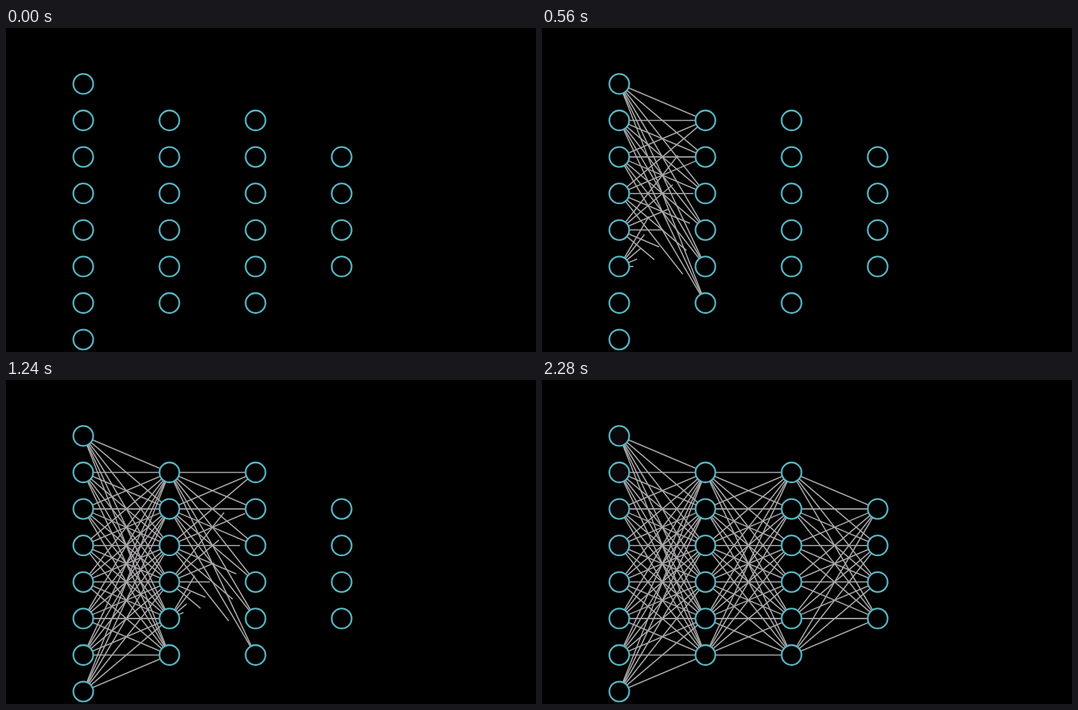
These frames come from a looping animation (720 by 440 pixels, 2320 ms). An HTML page with a canvas:

```html
<!DOCTYPE html>
<html lang="en">
<head>
<meta charset="utf-8">
<title>Network edges</title>
<style>
  html, body { margin: 0; width: 100%; height: 100%; overflow: hidden; background: #000; }
  canvas { display: block; }
</style>
</head>
<body>
<canvas id="stage" width="720" height="440"></canvas>
<script>
const ctx = document.getElementById('stage').getContext('2d');

const LOOP = 2320, STEP = 40;      // ms
const DRAW_TICKS = 60;             // edge drawing lasts 60 ticks at 30 per second
const LAG = 8;                     // each edge takes 1/LAG of the drawing time
const RADIUS = 13.5;

const layers = [8, 6, 6, 4].map((count, col) =>
  Array.from({ length: count }, (_, row) => ({
    x: 105 + col * 117,
    y: 249.5 + (row - (count - 1) / 2) * 49.6
  })));

// Edges run from rim to rim, ordered by layer, left node, right node.
const edges = layers.slice(1).flatMap((right, i) =>
  layers[i].flatMap(a => right.map(b => {
    const dx = b.x - a.x, dy = b.y - a.y, k = RADIUS / Math.hypot(dx, dy);
    return { x: a.x + dx * k, y: a.y + dy * k, dx: dx * (1 - 2 * k), dy: dy * (1 - 2 * k) };
  })));

const clamp = v => Math.min(1, Math.max(0, v));

function drawEdges(alpha) {
  ctx.strokeStyle = '#acaaac';
  ctx.lineWidth = 1.6;
  edges.forEach((e, i) => {
    const p = clamp(LAG * alpha - (LAG - 1) * i / edges.length);
    if (!p) return;
    ctx.beginPath();
    ctx.moveTo(e.x, e.y);
    ctx.lineTo(e.x + e.dx * p, e.y + e.dy * p);
    ctx.stroke();
  });
}

function drawNodes(glow) {
  ctx.strokeStyle = '#58b6c5';
  ctx.lineWidth = 2.3;
  layers.forEach((nodes, col) => nodes.forEach((n, row) => {
    ctx.beginPath();
    ctx.arc(n.x, n.y, RADIUS, 0, 2 * Math.PI);
    if (glow && col === 0 && row < 4) {
      ctx.fillStyle = glow;
      ctx.fill();
    }
    ctx.stroke();
  }));
}

function render(time) {
  const step = Math.floor((time % LOOP) / STEP);
  const tick = Math.round(step * STEP * 0.03);
  const ms = step * STEP;
  ctx.fillStyle = '#000';
  ctx.fillRect(0, 0, 720, 440);
  drawEdges(Math.min(1, tick / DRAW_TICKS));
  drawNodes(ms >= 2280 ? '#0a080a' : ms >= 2240 ? '#050405' : null);
}

let start = null;
function loop(now) {
  if (start === null) start = now;
  render(Math.max(0, now - start));
  requestAnimationFrame(loop);
}
render(0);
requestAnimationFrame(loop);
</script>
</body>
</html>
```
